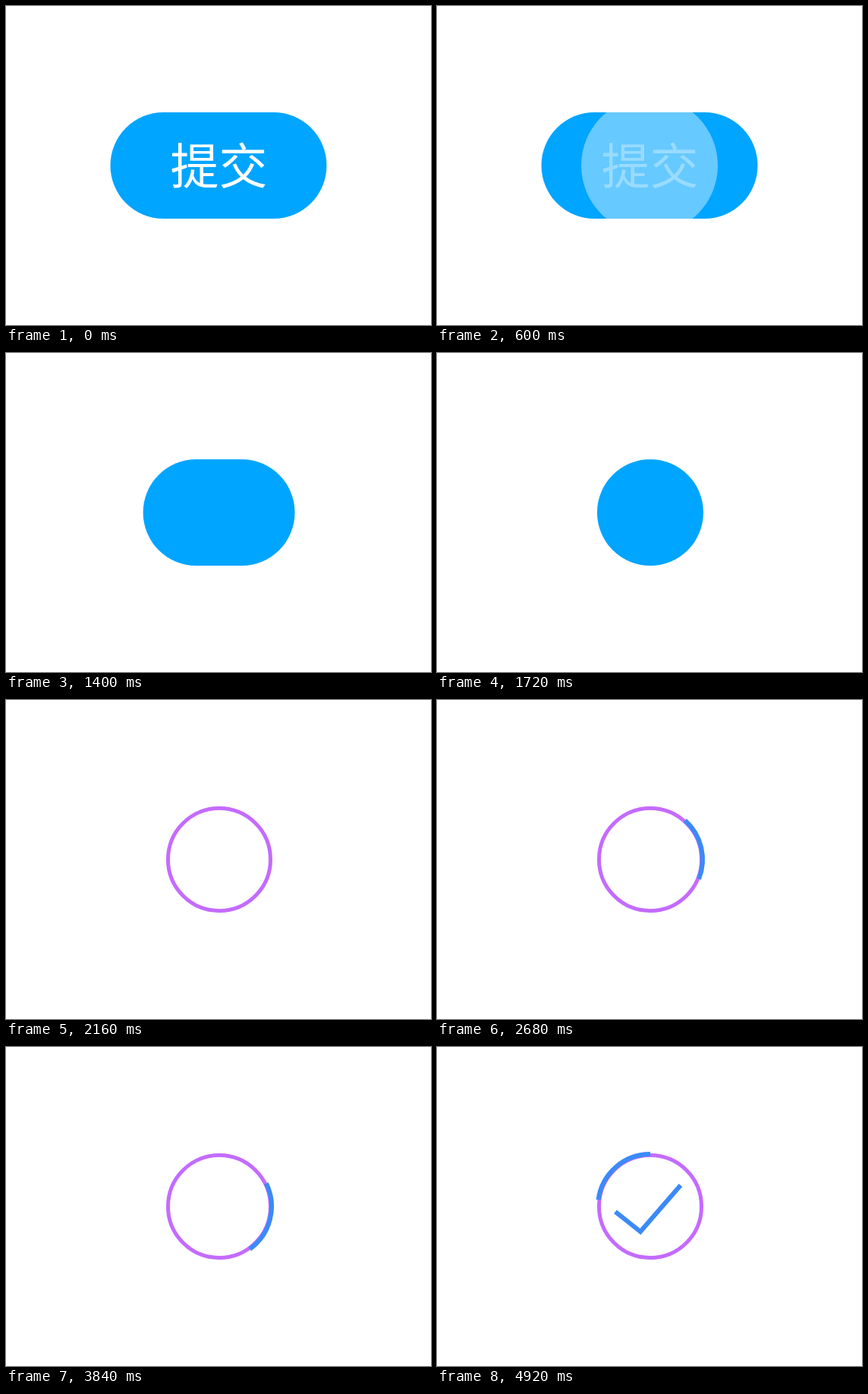
These frames come from a looping animation (560 px wide and 420 px high, 5.2 s). An HTML page:

```html
<!DOCTYPE html>
<html lang="zh-CN">
<head>
<meta charset="utf-8">
<title>提交</title>
<style>
  html, body { margin: 0; width: 100%; height: 100%; overflow: hidden; background: #fff; }
  svg { display: block; width: 560px; height: 420px; }
  text { font: 64px "Noto Sans CJK SC", "Noto Sans CJK", sans-serif; fill: #fff; text-anchor: middle; }
  .line { fill: none; stroke: #3b8af8; stroke-width: 6; }
</style>
</head>
<body>
<svg viewBox="0 0 560 420">
  <defs><clipPath id="pillClip"><rect x="137.5" y="140" width="285" height="140" rx="70"/></clipPath></defs>
  <g id="button">
    <rect id="pill" y="140" height="140" rx="70" fill="#00a5ff"/>
    <text id="label" x="280.5" y="234">提交</text>
    <g clip-path="url(#pillClip)"><circle id="ripple" cx="280" cy="210" fill="#fff"/></g>
  </g>
  <circle id="ring" cx="281" cy="210" r="67.5" fill="none" stroke="#c46bff" stroke-width="5"/>
  <path id="arc" class="line"/>
  <path id="check" class="line" d="M231 213.8 L268 243 L321 182"/>
</svg>
<script>
const LOOP = 5200, STEP = 40;
const byId = id => document.getElementById(id);
const [button, pill, label, ripple, ring, arc, check] =
  ['button', 'pill', 'label', 'ripple', 'ring', 'arc', 'check'].map(byId);

const progress = (t, start, end) => Math.min(1, Math.max(0, (t - start) / (end - start)));
const easeSine = x => (1 - Math.cos(Math.PI * x)) / 2;

function set(node, attributes) {
  for (const name in attributes) node.setAttribute(name, attributes[name]);
}

function polar(degrees, radius) {
  const a = degrees * Math.PI / 180;
  return `${281 + radius * Math.cos(a)} ${210 + radius * Math.sin(a)}`;
}

function drawButton(t) {
  const spread = progress(t, 0, 1000);
  const shrink = easeSine(progress(t, 1000, 1720));
  const left = 137.5 + 73.5 * shrink;
  const right = 422.5 - 71.5 * shrink;
  set(pill, { x: left, width: right - left });
  set(ripple, { r: 150 * spread, opacity: 1 - spread });
  set(label, { opacity: 1 - progress(t, 0, 900) });

  const swap = progress(t, 2000, 2160);
  set(button, { opacity: 1 - swap });
  set(ring, { opacity: swap });
}

// The arc runs counter-clockwise and lengthens slightly on its way.
function drawArc(t) {
  const remaining = 1080 * (1 - easeSine(progress(t, 1883, 4458)));
  const head = 187.4 + remaining;
  const tail = head + 82.6 - 0.0146 * remaining;
  set(arc, {
    d: `M${polar(tail, 69)} A69 69 0 0 0 ${polar(head, 69)}`,
    visibility: t > 2160 ? 'visible' : 'hidden'
  });
}

const checkLength = check.getTotalLength();
const dashLength = checkLength - 5;

function drawCheck(t) {
  const drawn = checkLength * progress(t, 4440, 4920) ** 2;
  set(check, {
    'stroke-dasharray': `${dashLength} 400`,
    'stroke-dashoffset': dashLength - drawn,
    visibility: drawn > 0 ? 'visible' : 'hidden'
  });
}

const startTime = performance.now();

function render() {
  const elapsed = (performance.now() - startTime) % LOOP;
  const t = Math.floor(elapsed / STEP) * STEP;
  drawButton(t);
  drawArc(t);
  drawCheck(t);
  requestAnimationFrame(render);
}
render();
</script>
</body>
</html>
```
